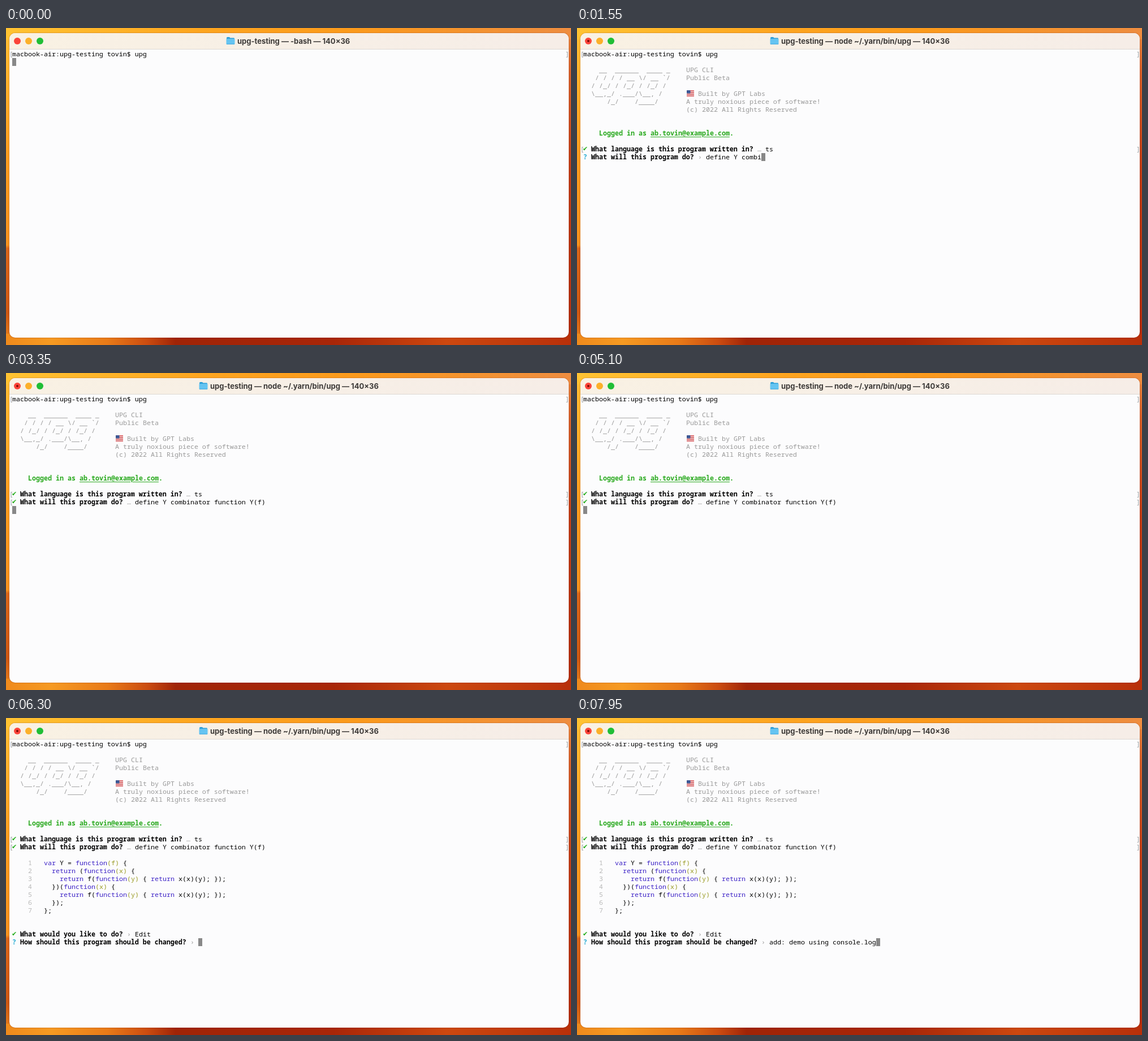
An HTML page for the animation above (8000 ms loop, 999 px wide and 560 px high).

```html
<!DOCTYPE html>
<html lang="en">
<head>
<meta charset="utf-8">
<title>Terminal session</title>
<style>
  html, body { margin: 0; width: 100%; height: 100%; overflow: hidden; }
  #stage {
    position: relative; width: 999px; height: 560px; overflow: hidden;
    background:
      linear-gradient(90deg, #ffc332, #fda51f 35%, #fb9a1c 62%, #ee8d40) 0 0 / 999px 20px no-repeat,
      linear-gradient(90deg, #ef8a1c, #f69a22 8%, #e87a18 18%, #cb4c10 25%, #a02407 30%, #a82608 58%, #cc480f 78%, #b8300a) 0 540px / 999px 20px no-repeat,
      linear-gradient(#ffc035, #fb9d1f 40%, #f6921e 68.5%, #da661a 69.5%, #cf5812 90%, #ea861e) 0 0 / 20px 560px no-repeat,
      linear-gradient(#ee8d40, #d8622a 14%, #c23e16 45%, #b32d0d) 979px 0 / 20px 560px no-repeat;
  }
  #window {
    position: absolute; left: 6px; top: 9px; width: 989px; height: 538px;
    border-radius: 10px; background: #fcfcfd; overflow: hidden;
    box-shadow: 0 0 2px #6008;
  }
  #bar {
    height: 28px; border-bottom: 1px solid #ded9d4;
    background: linear-gradient(90deg, #f9f1e3, #f7efe6 50%, #f6ede7);
  }
  .light { position: absolute; top: 17px; width: 12px; height: 12px; border-radius: 50%; }
  #dot { position: absolute; left: 4px; top: 4px; width: 4px; height: 4px; border-radius: 50%; background: #7d0c06; }
  #title {
    position: absolute; top: 14px; white-space: pre; color: #3d3a38;
    font: 700 13px/18px Inter, Roboto, sans-serif;
  }
  #folder { position: absolute; top: 15px; }
  #screen span {
    position: absolute; height: 14px; white-space: pre; color: #000;
    font: 400 11.667px/14px "Noto Sans Mono", "DejaVu Sans Mono", monospace;
  }
  #screen .bold, #screen .login, #screen .mail, #screen .ask { font-weight: 700; }
  #screen .gray { color: #999; }
  #screen .num { color: #b9b9b9; }
  #screen .login, #screen .mail { color: #28a91d; }
  #screen .mail { text-decoration: underline; text-underline-offset: 2px; }
  #screen .tick { color: #25ad1c; font: 11px/14px "DejaVu Sans", sans-serif; margin-left: -1px; }
  #screen .ask { color: #2eaed4; }
  #screen .key { color: #3c22c6; }
  #screen .arg { color: #999a22; }
  #screen .cursor { width: 7px; background: #888; }
  #flag { position: absolute; left: 194px; top: 110px; }
</style>
</head>
<body>
<div id="stage">
  <div id="window"><div id="bar"></div></div>
  <div class="light" style="left:14px;background:#fb4439"><div id="dot"></div></div>
  <div class="light" style="left:34px;background:#fcb029"></div>
  <div class="light" style="left:54px;background:#20be36"></div>
  <svg id="folder" width="16" height="15">
    <path d="M1 2.5Q1 1 2.5 1H6L7.5 2.5H14Q15 2.5 15 4V12H1Z" fill="#2f9fd8"/>
    <rect x=".5" y="4" width="15" height="10" rx="1.2" fill="#65c4f1"/>
    <path d="M1 13.5H15" stroke="#45abe0"/>
  </svg>
  <div id="title"></div>
  <div id="screen"></div>
  <svg id="flag" width="13" height="11">
    <rect width="13" height="11" rx="1.5" fill="#efe4e4"/>
    <path d="M0 1H13M0 4H13M0 7H13M0 10H13" stroke="#d6454a" stroke-width="1.6"/>
    <rect width="6.5" height="5.5" rx="1" fill="#3c5794"/>
  </svg>
</div>
<script>
const LOOP = 8000, CELL = 7, PITCH = 13.98;
const AT = {
  title: 50, banner: 100, prompt: 150, language: 550, languageDone: 700,
  task: 760, taskDone: 2750, code: 5550, edit: 6150, change: 6440
};
const CHAR_MS = 54.6;
const TASK = "define Y combinator function Y(f)";
const CHANGE = "add: demo using console.log";
const ART = [
  "    __  ______  ____ _",
  "   / / / / __ \\/ __ `/",
  "  / /_/ / /_/ / /_/ /",
  "  \\__,_/ .___/\\__, /",
  "      /_/    /____/"
];
const INFO = [
  [2, 26, "UPG CLI"], [3, 26, "Public Beta"], [5, 29, "Built by GPT Labs"],
  [6, 26, "A truly noxious piece of software!"], [7, 26, "(c) 2022 All Rights Reserved"]
];
const CODE = [
  "var Y = function(f) {",
  "  return (function(x) {",
  "    return f(function(y) { return x(x)(y); });",
  "  })(function(x) {",
  "    return f(function(y) { return x(x)(y); });",
  "  });",
  "};"
];

const el = id => document.getElementById(id);
const screen_ = el("screen");

function put(row, col, text, kind = "") {
  const span = document.createElement("span");
  span.className = kind;
  span.textContent = text;
  span.style.left = 11 + col * CELL + "px";
  span.style.top = 39 + row * PITCH + "px";
  screen_.append(span);
}

function marks(row) {
  put(row, -0.75, "[", "gray");
  put(row, 139.7, "]", "gray");
}

function cursor(row, col) { put(row, col, "", "cursor"); }

function question(row, text, answer, done, sign, typing = !done) {
  put(row, 0, done ? "✔" : "?", done ? "tick" : "ask");
  put(row, 2, text, "bold");
  const col = text.length + 3;
  put(row, col, sign, "gray");
  put(row, col + 2, answer);
  if (typing) cursor(row, col + 2 + answer.length);
}

function codeLine(row, line) {
  let col = 8;
  for (const part of line.split(/(\b(?:var|function|return)\b|(?<=function)\(\w\))/)) {
    const kind = /^(var|function|return)$/.test(part) ? "key"
      : /^\(\w\)$/.test(part) ? "arg" : "";
    if (part) put(row, col, part, kind);
    col += part.length;
  }
}

const typed = (text, start, t, step = CHAR_MS) =>
  text.slice(0, Math.max(0, Math.floor((t - start) / step)));

function draw(t) {
  screen_.replaceChildren();
  const running = t >= AT.title;
  const left = running ? 361 : 409;
  el("title").textContent =
    `upg-testing — ${running ? "node ~/.yarn/bin/upg" : "-bash"} — 140×36`;
  el("title").style.left = left + "px";
  el("folder").style.left = left - 20 + "px";
  el("dot").style.display = running ? "" : "none";
  el("flag").style.display = t >= AT.banner ? "" : "none";

  marks(0);
  put(0, 0, "macbook-air:upg-testing tovin$ upg");
  if (t < AT.banner) return cursor(1, 0);

  ART.forEach((line, i) => put(2 + i, 0, line, "gray"));
  INFO.forEach(([row, col, text]) => put(row, col, text, "gray"));
  put(10, 4, "Logged in as", "login");
  put(10, 17, "ab.tovin@example.com", "mail");
  put(10, 37, ".", "login");
  if (t < AT.prompt) return cursor(12, 0);

  const languageDone = t >= AT.languageDone;
  question(12, "What language is this program written in?",
    typed("ts", AT.language - 50, t, 50), languageDone, languageDone ? "…" : "›");
  if (!languageDone) return;
  marks(12);

  const taskDone = t >= AT.taskDone;
  question(13, "What will this program do?",
    typed(TASK, AT.task, t), taskDone, taskDone ? "…" : "›");
  if (!taskDone) return;
  marks(13);
  if (t < AT.code) return cursor(14, 0);

  CODE.forEach((line, i) => {
    put(15 + i, 4, String(i + 1), "num");
    codeLine(15 + i, line);
  });
  const editing = t >= AT.edit;
  question(24, "What would you like to do?", editing ? "Edit" : "", editing, "›", false);
  if (editing)
    question(25, "How should this program should be changed?",
      typed(CHANGE, AT.change, t), false, "›");
}

let last = -1;
function tick() {
  const t = Math.floor(performance.now() % LOOP / 10) * 10;
  if (t !== last) draw(last = t);
  requestAnimationFrame(tick);
}
tick();
</script>
</body>
</html>
```
